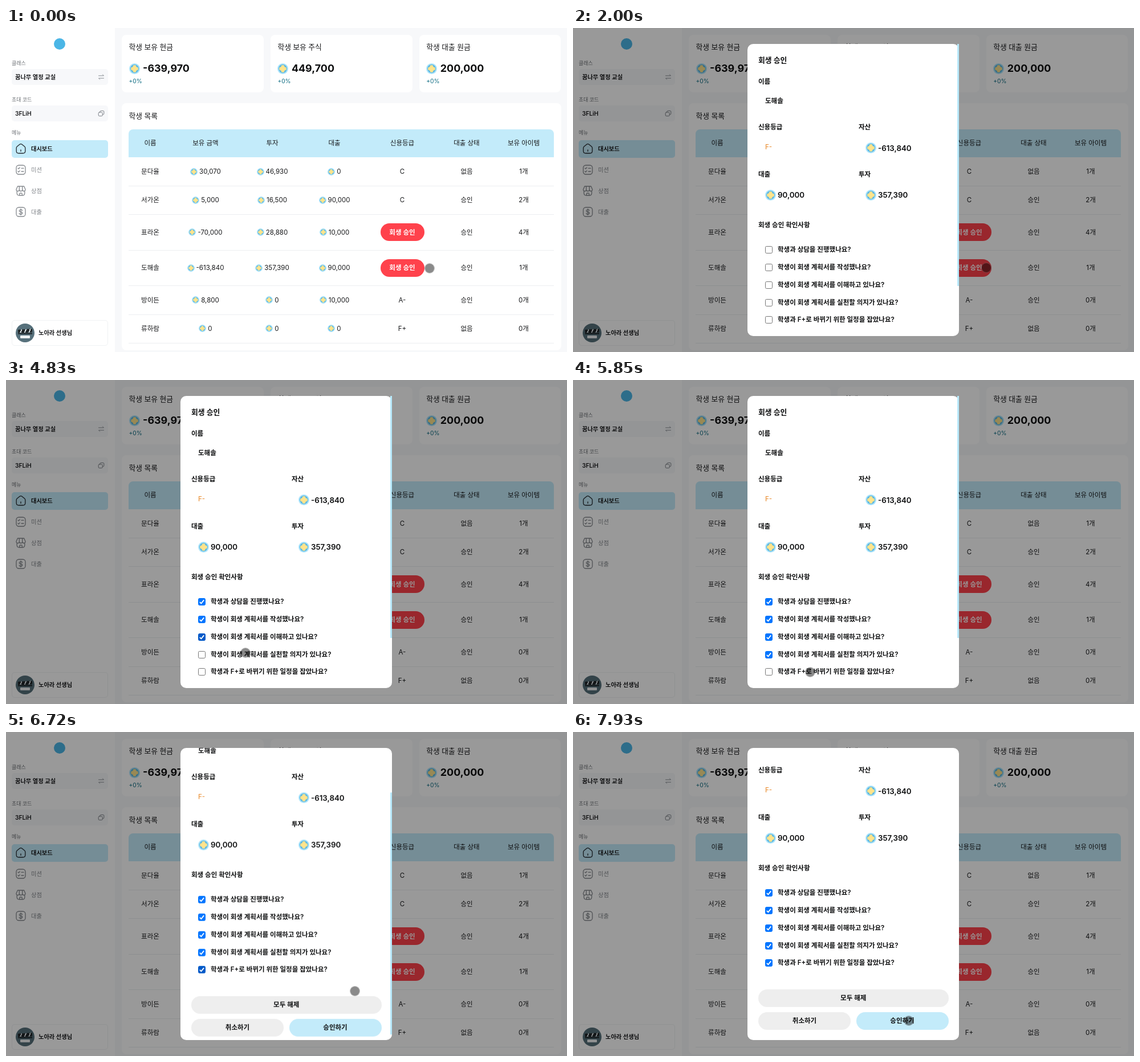
Animation of 984x569 px, one loop 8000 ms. Source, as an HTML page:

```html
<!DOCTYPE html>
<html lang="ko">
<head>
<meta charset="utf-8">
<title>학생 대시보드</title>
<style>
html, body { margin: 0; width: 100%; height: 100%; overflow: hidden; }
body { position: relative; background: #f7f8fa; color: #18191b; font-family: Inter, 'Noto Sans CJK KR', 'Noto Sans CJK', sans-serif; }
div, svg.icon { position: absolute; box-sizing: border-box; }
#page, #layer { left: 0; top: 0; width: 984px; height: 569px; overflow: hidden; }
#layer { background: rgba(0, 0, 0, .4); }
#modal { left: 306px; top: 28px; width: 371px; height: 513px; border-radius: 10px; background: #fff; overflow: hidden; }
#content { left: -306px; top: -28px; width: 984px; height: 700px; }
#thumb { left: 673.5px; top: 28px; width: 3.5px; height: 425px; background: #b7e9fb; }
#caret { left: 10px; top: 12px; width: 1px; height: 30px; background: #111; }
.text { display: flex; align-items: center; height: 20px; line-height: 20px; white-space: pre; }
.center { justify-content: center; width: 240px; }
.coin { flex: none; }
.box { width: 13px; height: 13px; border: 1px solid #767676; border-radius: 2.5px; background: #fff; }
.box svg { display: block; width: 11px; height: 11px; }
.icon { fill: none; stroke-width: 1.3; stroke-linecap: round; stroke-linejoin: round; overflow: visible; }
#cursor { left: -9px; top: -9px; width: 18px; height: 18px; }
#dot { inset: 0; border: 1.5px solid rgba(90, 90, 90, .4); border-radius: 50%; background: rgba(0, 0, 0, .46) padding-box; }
#ring { inset: -2.5px; border-radius: 50%; background: rgba(0, 0, 0, .22); }
</style>
</head>
<body>
<div id="page"></div>
<div id="layer">
  <div id="modal"><div id="content"></div></div>
  <div id="thumb"></div>
</div>
<div id="caret"></div>
<div id="cursor"><div id="ring"></div><div id="dot"></div></div>
<script>
(() => {
const LOOP = 8000;
const SKY = '#c3ebfa';
const $ = id => document.getElementById(id);
const page = $('page'), content = $('content');

function add(parent, css, html = '', cls = '') {
  const el = document.createElement('div');
  el.style.cssText = css;
  el.className = cls;
  el.innerHTML = html;
  parent.append(el);
  return el;
}

function rect(parent, x, y, w, h, fill, radius = 0, more = '') {
  return add(parent, `left:${x}px;top:${y}px;width:${w}px;height:${h}px;background:${fill};border-radius:${radius}px;${more}`);
}

// y is the middle of the line; x is its left edge, or its middle when centered
function text(parent, html, x, y, { size = 11.52, weight = 400, color = 'inherit', gap = 3, center = false } = {}) {
  const left = center ? x - 120 : x;
  return add(parent,
    `left:${left}px;top:${y - 10}px;font-size:${size}px;font-weight:${weight};color:${color};gap:${gap}px`,
    html, center ? 'text center' : 'text');
}

function coin(size) {
  return `<svg class="coin" width="${size}" height="${size}" viewBox="-10 -10 20 20">
    <circle r="10" fill="#aee5fa"/><circle r="7.8" fill="#56b5e5"/>
    <path d="M-2-6h4q0 4 4 4v4q-4 0-4 4h-4q0-4-4-4v-4q4 0 4-4z" fill="#ffe48c" stroke="#ffe48c" stroke-linejoin="round"/></svg>`;
}

function icon(x, y, color, shapes) {
  page.insertAdjacentHTML('beforeend',
    `<svg class="icon" style="left:${x - 10}px;top:${y - 10}px" width="20" height="20" viewBox="-10 -10 20 20" stroke="${color}">${shapes}</svg>`);
}

// Sidebar
rect(page, 0, 0, 190.5, 569, '#fff');
rect(page, 84, 18, 20, 20, '#4bb6e6', 10);
const label = { size: 8.96, weight: 500, color: '#6c7075' };
text(page, '클래스', 10, 62, label);
text(page, '초대 코드', 10, 126, label);
text(page, '메뉴', 10, 184, label);
rect(page, 10, 72, 169, 28, '#f7f8fa', 5);
rect(page, 10, 136, 169, 28, '#f7f8fa', 5);
text(page, '꿈나무 열정 교실', 16, 86, { size: 10.24, weight: 600 });
text(page, '3FLiH', 16, 150, { size: 10.24, weight: 600 });
icon(166.5, 86, '#8b9096', '<g stroke-width="1"><path d="M-4.5-2.2h9l-2-2M4.5 2.2h-9l2 2"/></g>');
icon(166.5, 150, '#7d8288', '<g stroke-width="1"><rect x="-4.8" y="-2" width="7" height="6.6" rx="1.6"/><path d="M-2-2.4v-.6q0-1.6 1.6-1.6h3.6q1.6 0 1.6 1.6v3.4q0 1.6-1.6 1.6h-.6"/></g>');

rect(page, 10, 197, 168.5, 30.5, SKY, 5);
const frame = '<rect x="-8" y="-8" width="16" height="16" rx="4.5"/>';
[
  ['대시보드', '<path d="M-7.8-1.2q0-1.8 1.4-2.9l4.6-3.6q1.8-1.4 3.6 0l4.6 3.6q1.4 1.1 1.4 2.9v5.2q0 4-4 4h-7.6q-4 0-4-4zM0 2v2.5"/>'],
  ['미션', frame + '<path d="M-5-2.8l1.2 1.2 2-2.4M-5 2.8L-3.8 4l2-2.4M1-2.6h4M1 3h4"/>'],
  ['상점', '<path d="M-6.8 0v4q0 4 4 4h5.6q4 0 4-4v-4M-5.6-8h11.2l2.4 5.5q0 3-2.6 3T2.7-2.5q0 3-2.7 3t-2.7-3q0 3-2.7 3T-8-2.5zM-2.7-2.5V-8M2.7-2.5V-8M-2.3 8V5.5q0-1.5 1.5-1.5h1.6q1.5 0 1.5 1.5V8"/>'],
  ['대출', frame + '<path d="M2.7-2.4q-.4-1.7-2.7-1.7T-2.7-2.1Q-2.7-.4 0 0T2.7 2.1Q2.7 4.1 0 4.1T-2.7 2.4M0-5.4V5.4"/>']
].forEach(([name, shapes], i) => {
  const y = 212 + 37 * i;
  icon(25.5, y, i ? '#85898e' : '#24292d', shapes);
  text(page, name, 44, y, { size: 10.24, weight: i ? 500 : 600, color: i ? '#83878c' : 'inherit' });
});

rect(page, 10, 513, 168.5, 44.5, '#fff', 5, 'border:1px solid #f0f2f4');
const avatar = rect(page, 17, 519, 32.5, 32.5, '#56707b', 17, 'overflow:hidden');
rect(avatar, 4, 9.5, 25, 6, 'repeating-linear-gradient(115deg,#202628 0 5px,#d5dde0 5px 7px)', 1, 'transform:rotate(-4deg)');
rect(avatar, 4, 16, 25, 3, '#2c383d');
rect(avatar, 8, 21, 17, 4.5, '#edf1f2', 1);
text(page, '노아라 선생님', 57, 535, { size: 10.24, weight: 600 });

// Totals
[['학생 보유 현금', '-639,970'], ['학생 보유 주식', '449,700'], ['학생 대출 원금', '200,000']].forEach(([title, sum], i) => {
  const x = 203 + 260.9 * i;
  rect(page, x, 12, 248.7, 101, '#fff', 8);
  text(page, title, x + 12.5, 34, { size: 12.8, weight: 500 });
  text(page, coin(19) + sum, x + 12.5, 71, { size: 17.92, weight: 700, color: '#0c0d0e', gap: 5.5 });
  text(page, '+0%', x + 12.5, 93, { size: 10.24, color: '#0b6a80' });
});

// Student table
const columns = [253, 350, 467, 576, 695, 808, 908];
rect(page, 203, 132, 770.5, 434, '#fff', 8);
text(page, '학생 목록', 215.5, 154.5, { size: 12.8, weight: 500 });
rect(page, 215, 177.5, 746, 49.5, SKY, 0, 'border-radius:8px 8px 0 0');
['이름', '보유 금액', '투자', '대출', '신용등급', '대출 상태', '보유 아이템'].forEach((name, i) =>
  text(page, name, columns[i], 202, { weight: 500, center: true }));

const PICKED = '도해솔';
let rowTop = 227;
[
  ['문다율', '30,070', '46,930', '0', 'C', '없음', 1],
  ['서가온', '5,000', '16,500', '90,000', 'C', '승인', 2],
  ['표라온', '-70,000', '28,880', '10,000', '', '승인', 4],
  [PICKED, '-613,840', '357,390', '90,000', '', '승인', 1],
  ['방이든', '8,800', '0', '10,000', 'A-', '승인', 0],
  ['류하람', '0', '0', '0', 'F+', '없음', 0]
].forEach(row => {
  const height = row[4] ? 50.2 : 62.5;
  const y = rowTop + height / 2;
  row.forEach((value, i) => {
    if (i === 4 && !value) {
      rect(page, 656.5, y - 15.4, 77, 31, '#ff424c', 16);
      text(page, '회생 승인', 695, y, { weight: 600, color: '#fff', center: true });
      return;
    }
    const isMoney = i > 0 && i < 4;
    text(page, isMoney ? coin(13) + value : i === 6 ? value + '개' : value, columns[i], y, { center: true });
  });
  rowTop += height;
  rect(page, 215, Math.round(rowTop), 746, 1, '#eceef1');
});

// Dialog
const strong = { weight: 600, color: '#0c0d0e' };
text(content, '회생 승인', 325, 57, { ...strong, size: 12.8 });
[['이름', 325, 94], [PICKED, 337, 128], ['신용등급', 325, 174], ['자산', 501, 174],
 ['대출', 325, 257], ['투자', 501, 257], ['회생 승인 확인사항', 325, 345.5]]
  .forEach(([name, x, y]) => text(content, name, x, y, strong));
text(content, 'F-', 337, 209, { weight: 500, color: '#ea943e' });
[['-613,840', 513, 210.5], ['90,000', 337, 293], ['357,390', 513, 293]]
  .forEach(([sum, x, y]) => text(content, coin(19) + sum, x, y, { ...strong, size: 13.3 }));

const boxes = [
  '학생과 상담을 진행했나요?',
  '학생이 회생 계획서를 작성했나요?',
  '학생이 회생 계획서를 이해하고 있나요?',
  '학생이 회생 계획서를 실천할 의지가 있나요?',
  '학생과 F+로 바뀌기 위한 일정을 잡았나요?'
].map((question, i) => {
  const y = 389 + 30.85 * i;
  text(content, question, 359, y, strong);
  return add(content, `left:337px;top:${y - 6}px`,
    '<svg viewBox="0 0 11 11"><path d="M1.8 5.8l2.6 2.6 4.8-6" fill="none" stroke="#fff" stroke-width="1.8"/></svg>', 'box');
});

[['모두 해제', 325, 559, 333.5, '#eee'], ['취소하기', 325, 599, 162, '#eee'], ['승인하기', 496.5, 599, 162, SKY]]
  .forEach(([name, x, y, w, fill]) => {
    rect(content, x, y, w, 31, fill, 16);
    text(content, name, x + w / 2, y + 15.3, { ...strong, center: true });
  });

// Motion: each entry is [ms, value, easing up to the next entry]
function play(el, prop, entries) {
  const held = [...entries, [LOOP, entries[entries.length - 1][1]]];
  el.animate(
    held.map(([ms, value, easing = 'step-end']) => ({ offset: ms / LOOP, [prop]: value, easing })),
    { duration: LOOP, iterations: Infinity });
}

const showDuring = (el, spans) =>
  play(el, 'opacity', [[0, 0], ...spans.flatMap(([from, to]) => [[from, 1], [to, 0]])]);

play($('layer'), 'opacity', [[0, 0], [2000, 1]]);
showDuring($('caret'), [[1660, 2000]]);
showDuring($('ring'), [[1660, 1800], [3360, 3430], [4030, 4100], [4500, 4570], [4910, 4980], [6060, 6130], [7800, 7930]]);

[[3430, 4030], [4100, 4500], [4570, 4910], [4980, 5240], [6130, 7060]].forEach(([click, leave], i) => {
  play(boxes[i], 'backgroundColor', [[0, '#fff'], [click, '#0059c8'], [leave, '#0075ff']]);
  play(boxes[i], 'borderColor', [[0, '#767676'], [click, '#0059c8'], [leave, '#0075ff']]);
});

const glide = 'cubic-bezier(.23,.54,.4,.97)';
const slide = (el, distance) => play(el, 'transform', [
  [0, 'translateY(0px)'], [6520, 'translateY(0px)', glide], [6860, `translateY(${distance}px)`]]);
slide(content, -107);
slide($('thumb'), 88);
play($('thumb'), 'opacity', [[0, 1], [6860, 0]]);

const path = [
  [0, 743, 422], [600, 743, 422, 'ease-in-out'], [1270, 725, 421],
  [2330, 725, 421, 'ease-in'], [2680, 480, 374, 'ease-out'], [2890, 442.5, 388.5],
  [3440, 442.5, 388.5, 'ease-in-out'], [3700, 427, 425],
  [4170, 427, 425, 'ease-in-out'], [4440, 423, 452],
  [4590, 423, 452, 'ease-in-out'], [4830, 420, 479], [4910, 419.5, 480.5],
  [5190, 419.5, 480.5, 'ease-in-out'], [5640, 416, 517, 'ease-in-out'], [5850, 416, 513],
  [6120, 416, 513, 'ease-in-out'], [6390, 612, 455],
  [7030, 612, 455, 'ease-in-out'], [7720, 589, 507]
];
play($('cursor'), 'transform', path.map(([ms, x, y, easing]) => [ms, `translate(${x}px,${y}px)`, easing]));
})();
</script>
</body>
</html>
```
